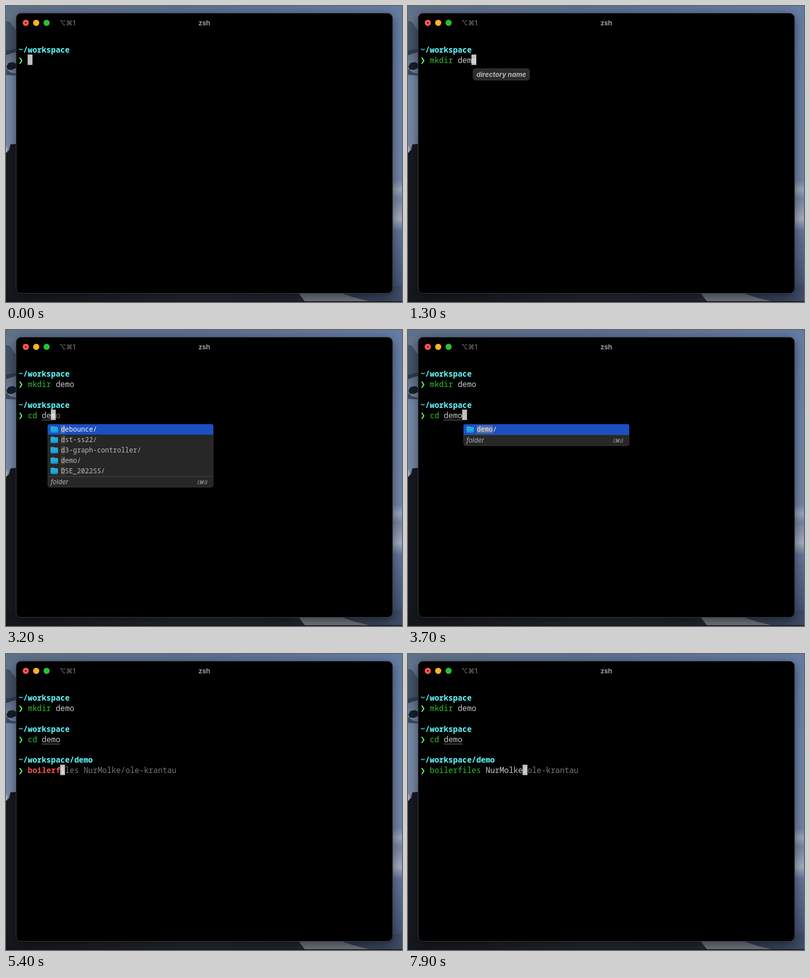
These frames come from a looping animation (800x597 px, 8000 ms). An HTML page with a canvas:

```html
<!DOCTYPE html>
<html lang="en">
<head>
<meta charset="utf-8">
<title>Terminal session</title>
<style>
html, body { margin: 0; width: 800px; height: 597px; overflow: hidden; background: #000; }
canvas { display: block; }
</style>
</head>
<body>
<canvas id="stage" width="800" height="597"></canvas>
<script>
const ctx = document.getElementById('stage').getContext('2d');
const LOOP = 8000;
const MONO = '"Noto Sans Mono", "DejaVu Sans Mono", monospace';
const SANS = 'Inter, "DejaVu Sans", sans-serif';
const CELL = 9.39, LINE = 20.9, LEFT = 25.3, BASE = 94;
const COLOR = {
  path: '#60fdff', prompt: '#5ff967', valid: '#2fbe2b', invalid: '#ef5149',
  text: '#c7c7c7', ghost: '#767676', cursor: '#c1c1c1', underline: '#858585'
};

// Each key is the time at which the matching character is typed.
const commands = [
  { path: '~/workspace', text: 'mkdir demo', name: 5, start: 0, enter: 1900,
    keys: [300, 400, 500, 600, 700, 900, 1000, 1100, 1200, 1400] },
  { path: '~/workspace', text: 'cd demo', name: 2, start: 1900, enter: 3900,
    keys: [2500, 2600, 2800, 3100, 3200, 3300, 3400] },
  { path: '~/workspace/demo', text: 'boilerfiles NurMolke/ole-krantau', name: 11, start: 3900, enter: Infinity,
    keys: [4500, 4700, 4800, 5000, 5100, 5300, 5400, 5600, 5700, 5800, 6000, 6200,
           6400, 6600, 6700, 7000, 7100, 7300, 7500, 7800] }
];
const folders = ['debounce/', 'dst-ss22/', 'd3-graph-controller/', 'demo/', 'DSE_2022SS/'];

const column = n => LEFT + n * CELL;
const baseline = row => BASE + row * LINE;
const typedAt = (cmd, t) => cmd.keys.filter(k => k <= t).length;

function label(str, x, y, color, font, align = 'left') {
  ctx.font = font;
  ctx.fillStyle = color;
  ctx.textAlign = align;
  ctx.fillText(str, x, y);
}

function mono(str, col, row, color, weight = '') {
  label(str, column(col), baseline(row), color, `${weight} 15.65px ${MONO}`);
}

function rect(x, y, w, h, color) {
  ctx.fillStyle = color;
  ctx.fillRect(x, y, w, h);
}

function box(x, y, w, h, r, fill, stroke) {
  ctx.beginPath();
  ctx.roundRect(x, y, w, h, r);
  ctx.fillStyle = fill;
  ctx.fill();
  if (stroke) {
    ctx.strokeStyle = stroke;
    ctx.lineWidth = 1;
    ctx.stroke();
  }
}

function disc(x, y, r, color) {
  ctx.beginPath();
  ctx.arc(x, y, r, 0, 7);
  ctx.fillStyle = color;
  ctx.fill();
}

function polygon(color, ...points) {
  ctx.beginPath();
  points.forEach(([x, y]) => ctx.lineTo(x, y));
  ctx.fillStyle = color;
  ctx.fill();
}

function gradient(x, y, x2, y2, ...stops) {
  const g = ctx.createLinearGradient(x, y, x2, y2);
  stops.forEach(([at, color]) => g.addColorStop(at, color));
  return g;
}

function drawWallpaper() {
  rect(0, 0, 800, 40, gradient(0, 0, 800, 0, [0, '#5f7189'], [0.5, '#5b7194'], [1, '#657ca3']));
  // coast on the left
  rect(0, 14, 36, 583, gradient(0, 14, 0, 290,
    [0, '#62748d'], [0.3, '#62738c'], [0.5, '#768aa8'], [1, '#7888a5']));
  polygon('#445267', [0, 30], [8, 32], [16, 44], [22, 50], [22, 88], [0, 92]);
  polygon('#303b4a', [0, 90], [22, 86], [22, 92], [0, 99]);
  polygon('#171d27', [1, 122], [5, 115], [14, 113], [20, 116], [20, 125], [12, 129], [3, 128]);
  polygon('#3d4a5f', [0, 127], [9, 134], [22, 137], [22, 140], [0, 139]);
  polygon('#16191f', [0, 296], [6, 291], [9, 279], [36, 277], [36, 597], [0, 597]);
  polygon('#a9b2c0', [0, 290], [1, 280], [3, 288], [2, 295], [0, 296]);
  // water on the right
  rect(765, 14, 35, 583, gradient(0, 0, 0, 597,
    [0, '#657ca3'], [0.3, '#6d83aa'], [0.59, '#7184a6'], [0.62, '#9aa6ba'], [0.65, '#7686a5'],
    [0.68, '#8895b0'], [0.72, '#a4aec0'], [0.76, '#61749a'], [0.93, '#465777'], [1, '#303d57']));
  // shore along the bottom
  rect(0, 565, 800, 32, gradient(0, 0, 800, 0,
    [0, '#14171d'], [0.45, '#23272f'], [0.72, '#20252e'], [0.86, '#333e52'], [1, '#3e4c67']));
  polygon('#707681', [592, 580], [680, 580], [704, 588], [736, 596], [604, 596]);
  rect(0, 595.5, 800, 1.5, '#10131a');
}

function drawWindow() {
  ctx.save();
  ctx.shadowColor = 'rgba(0,0,0,.5)';
  ctx.shadowBlur = 22;
  ctx.shadowOffsetY = 6;
  box(20.5, 14.5, 760.5, 565, 10, '#000');
  ctx.restore();
  box(20.5, 14.5, 760.5, 565, 10, '#000', '#3c3f44');
  disc(40, 34, 6.2, '#fe5951');
  disc(40, 34, 1.9, '#8c0e0a');
  disc(61, 34, 6.2, '#fdb027');
  disc(82, 34, 6.2, '#28c033');
  label('⌥⌘1', 107.5, 39, '#666', `600 13.5px ${SANS}`);
  label('zsh', 400.5, 39, '#9a9a9a', `bold 13.5px ${SANS}`, 'center');
}

function drawCommand(cmd, row, t) {
  const count = typedAt(cmd, t);
  const active = t < cmd.enter;
  const typed = cmd.text.slice(0, count);
  const known = count >= cmd.name;
  mono(cmd.path, 0, row, COLOR.path, 'bold');
  label('❯', LEFT - 0.5, baseline(row + 1) + 0.5, COLOR.prompt, 'bold 17px "DejaVu Sans Mono", monospace');
  mono(typed.slice(0, cmd.name), 2, row + 1, known ? COLOR.valid : COLOR.invalid, known ? '' : 'bold');
  mono(typed.slice(cmd.name), 2 + cmd.name, row + 1, COLOR.text);

  // Arguments that name an existing path are underlined.
  const argument = cmd.name + 1;
  if (cmd.text.startsWith('cd') && count > argument) {
    rect(column(2 + argument), Math.round(baseline(row + 1) + 3), (count - argument) * CELL, 1, COLOR.underline);
  }
  if (!active) return;
  const col = 2 + count;
  const ghost = count > 1 ? cmd.text.slice(count) : '';
  mono(ghost.slice(1), col + 1, row + 1, COLOR.ghost);
  rect(column(col) - 0.4, baseline(row + 1) - 17, 9.8, 21, COLOR.cursor);
  mono(ghost.slice(0, 1), col, row + 1, '#eee');
}

function drawHint(count) {
  const x = Math.round(column(2 + count) + 2) + 0.5;
  box(x, 126.5, 114, 23, 5, '#2b2b2b', '#3a3a3a');
  label('directory name', x + 57, 143, '#b4b4b4', `italic bold 13.5px ${SANS}`, 'center');
}

function drawFolder(x, y) {
  box(x, y, 8, 5, 1.5, '#1595c9');
  box(x, y + 1.5, 15, 11.5, 1.5, gradient(0, y, 0, y + 13, [0, '#36c8f0'], [1, '#168dd2']));
  rect(x + 0.5, y + 3.5, 14, 1, '#1686bd');
}

function drawFolderList(count) {
  const query = commands[1].text.slice(3, count);
  const matches = folders.filter(f => f.toLowerCase().startsWith(query));
  const x = Math.round(column(2 + count) + 2), top = 190, row = 20.9;
  const height = matches.length * row + 23;
  box(x + 0.5, top + 0.5, 334, height - 1, 4, '#272727', '#373737');
  ctx.font = `13.5px ${MONO}`;
  const cell = ctx.measureText('d').width;
  matches.forEach((name, i) => {
    const y = top + i * row;
    if (!i) box(x, top, 335, 21, [4, 4, 0, 0], '#1a50c2');
    drawFolder(x + 6, y + 4);
    rect(x + 27, y + 2.5, query.length * cell, 16, i ? '#4b4133' : '#566f9c');
    label(name, x + 27, y + 15, i ? '#b9b9b9' : '#f2f2f2', `13.5px ${MONO}`);
  });
  rect(x, Math.round(top + matches.length * row), 335, 1, '#484848');
  label('folder', x + 6, top + height - 6.5, '#b0b0b0', `italic 13px ${SANS}`);
  label('(⌘i)', x + 323, top + height - 7, '#b0b0b0', `italic 10.5px ${SANS}`, 'right');
}

function draw(now) {
  const t = (now + 20) % LOOP;
  drawWallpaper();
  drawWindow();
  commands.forEach((cmd, i) => {
    if (t >= cmd.start) drawCommand(cmd, i * 3, t);
  });
  // Completion popups trail the typing slightly.
  const [make, change] = commands;
  const hintCount = typedAt(make, t - 100);
  const listCount = typedAt(change, t - 100);
  if (hintCount > make.name && t < make.enter - 200) drawHint(hintCount);
  if (listCount > change.name + 1 && t < change.enter - 100) drawFolderList(listCount);
}

function frame() {
  draw(performance.now());
  requestAnimationFrame(frame);
}
frame();
</script>
</body>
</html>
```
